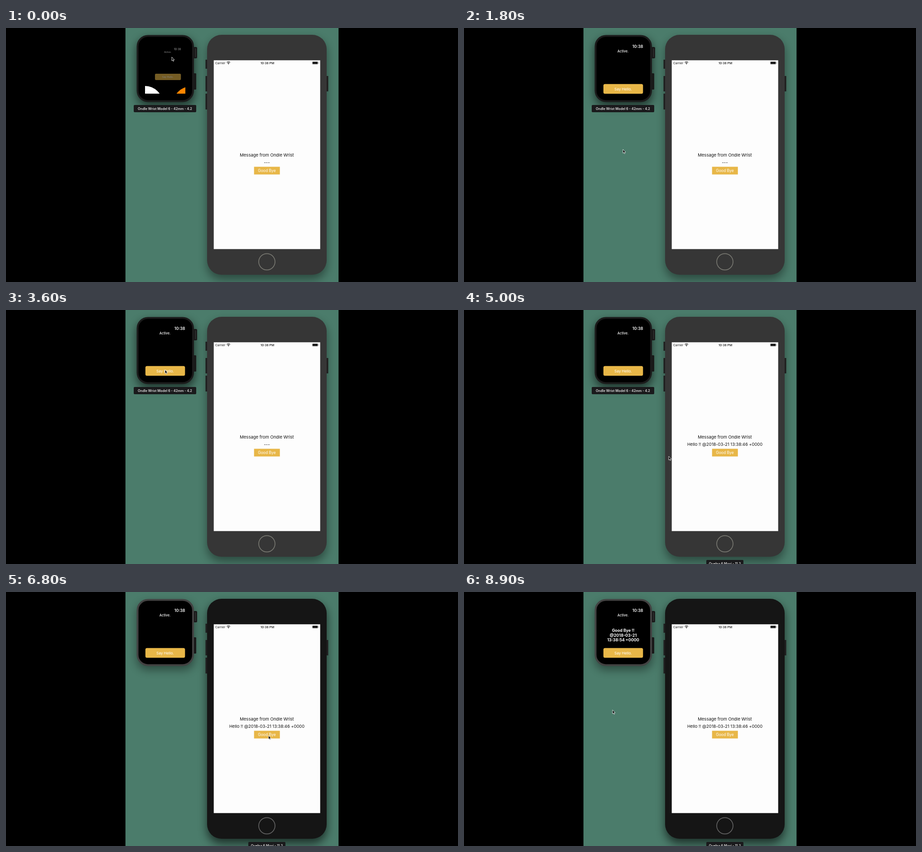
Animation, 998 px wide and 561 px high, one loop 9 s. Source, as an HTML page:

```html
<!DOCTYPE html>
<html lang="en">
<head>
<meta charset="utf-8">
<title>Watch and phone messages</title>
<style>
html, body { margin: 0; width: 100%; height: 100%; overflow: hidden; background: #000; }
svg { display: block; width: 998px; height: 561px; }
text { font-family: Inter, "Liberation Sans", sans-serif; text-anchor: middle; }
.gold { fill: #e8b748; }
.label rect { fill: #1a1a1c; }
.label text { fill: #e2e2e2; font-size: 7.3px; font-weight: 600; }
#message { font-variant-ligatures: none; }
</style>
</head>
<body>
<svg viewBox="0 0 998 561">
  <defs>
    <filter id="blur" x="-40%" y="-40%" width="180%" height="180%"><feGaussianBlur stdDeviation="10"/></filter>
    <clipPath id="desk"><rect x="263.5" width="471" height="561"/></clipPath>
    <clipPath id="face"><rect x="307" y="36" width="89" height="109"/></clipPath>
  </defs>
  <rect width="998" height="561"/>
  <g clip-path="url(#desk)">
    <rect x="263.5" width="471" height="561" fill="#4b7c6b"/>
    <rect id="watchShadow" x="289" y="24" width="127" height="148" rx="24" filter="url(#blur)"/>
    <rect id="phoneShadow" x="444" y="24" width="264" height="532" rx="32" filter="url(#blur)"/>

    <!-- Watch -->
    <g fill="#191919">
      <rect x="411" y="42" width="11" height="25" rx="2.5"/>
      <rect x="411" y="100" width="9" height="36" rx="1.5"/>
    </g>
    <path d="M418.5 45v19" stroke="#343434" stroke-width="1.5"/>
    <rect id="bezel" x="290.5" y="17.5" width="122.5" height="144" rx="23" stroke-width="4"/>
    <g clip-path="url(#face)">
      <g id="icons">
        <circle cx="307" cy="167" r="39" fill="#fff"/>
        <circle cx="408" cy="168" r="39" fill="#ff8500"/>
      </g>
    </g>
    <g id="app" fill="#fff">
      <text x="383.6" y="44" font-size="8.8" font-weight="600">10:38</text>
      <text x="351" y="53.6" font-size="7.4" font-weight="500">Active.</text>
      <g id="bye" font-size="8.9" font-weight="700">
        <text x="351.5" y="88.2">Good Bye !!</text>
        <text x="351.5" y="98.7">@2018-03-21</text>
        <text x="351.5" y="109.2">13:38:54 +0000</text>
      </g>
      <rect class="gold" x="307.8" y="123.7" width="87.5" height="21.5" rx="3.5"/>
      <text x="351.3" y="137.6" font-size="8.2">Say Hello.</text>
    </g>
    <g id="watchLabel" class="label">
      <rect x="282" y="170" width="138" height="16" rx="2"/>
      <text x="351" y="181">Ondle Wrist Model 6 - 42mm - 4.2</text>
    </g>

    <!-- Phone -->
    <path d="M442.5 70v20M442.5 106v34M442.5 145v35M709.5 106v34" stroke="#1f1f1f" stroke-width="4"/>
    <rect id="body" x="444" y="15" width="264" height="530" rx="32"/>
    <rect x="458.7" y="71.3" width="235" height="417" fill="#fdfdfd"/>
    <circle id="home" cx="576" cy="516.3" r="18" fill="none" stroke-width="1.7"/>
    <g fill="#111">
      <text x="473" y="79.8" font-size="6.8">Carrier</text>
      <text x="577" y="79.8" font-size="6.8" font-weight="500">10:38 PM</text>
      <path d="M487.4 75.8Q491.2 72.7 495 75.8M489 77.8Q491.2 75.8 493.4 77.8" fill="none" stroke="#111" stroke-width="1.2"/>
      <path d="M489.9 79l1.3 1.4 1.3-1.4q-1.3-1-2.6 0z"/>
      <rect x="676" y="74" width="13" height="6.3" rx="1.5" fill="none" stroke="#999" stroke-width=".6"/>
      <rect x="676.8" y="74.7" width="11.4" height="4.9" rx="1"/>
      <rect x="689.6" y="76" width="1" height="2.4" fill="#888"/>
      <text x="576" y="283.5" font-size="9.5">Message from Ondle Wrist</text>
      <text id="message" x="576" y="299.6" font-size="9.35"></text>
    </g>
    <rect class="gold" x="547.7" y="306.5" width="57" height="17"/>
    <text x="576" y="318" font-size="8.5" fill="#fff">Good Bye</text>
    <g id="phoneLabel" class="label">
      <rect x="535" y="552" width="82" height="16" rx="2"/>
      <text x="576" y="563">Quelna 6 Maxi - 11.2</text>
    </g>

    <path id="cursor" d="M0 0v8.4l1.9-1.7 1.3 3 1.4-.6-1.3-2.9h2.6z" fill="#080808" stroke="#fff" stroke-width=".8"/>
  </g>
</svg>
<script>
const $ = id => document.getElementById(id);
const LOOP = 9000, STEP = 100;

// Pointer stops: time, x, y
const stops = [
  [0, 366, 64], [500, 366, 64], [1400, 351, 268], [2500, 351, 268], [3300, 351, 132],
  [4200, 351, 132], [5000, 452, 323], [5900, 579.5, 317], [7700, 579.5, 317],
  [8700, 328, 260.5], [LOOP, 328, 260.5]
];

const ease = u => u * u * (3 - 2 * u);
const set = (id, name, value) => $(id).setAttribute(name, value);
const show = (id, on) => set(id, "display", on ? "inline" : "none");
const zoom = (id, k) => set(id, "transform", `translate(369 58) scale(${k}) translate(-369 -58)`);

function pointerAt(t) {
  const i = stops.findIndex(s => s[0] > t);
  const [t0, x0, y0] = stops[i - 1], [t1, x1, y1] = stops[i];
  const u = ease((t - t0) / (t1 - t0));
  return [x0 + (x1 - x0) * u, y0 + (y1 - y0) * u];
}

function draw(t) {
  const open = 1 - (1 - Math.min(t / 400, 1)) ** 2;
  const scale = 0.655 + 0.345 * open;
  zoom("app", scale);
  set("app", "opacity", 0.5 + 0.5 * open);
  zoom("icons", scale / 0.655);
  show("icons", open < 1);

  // The focused device is darker and casts the stronger shadow
  const phoneActive = t >= 6500;
  set("bezel", "stroke", phoneActive ? "#424242" : "#1b1b1b");
  set("body", "fill", phoneActive ? "#151515" : "#363636");
  set("home", "stroke", phoneActive ? "#626262" : "#777770");
  set("watchShadow", "opacity", phoneActive ? 0.4 : 0.6);
  set("phoneShadow", "opacity", phoneActive ? 0.6 : 0.4);
  show("watchLabel", !phoneActive);
  show("phoneLabel", t >= 5000);

  $("message").textContent = t < 4000 ? "---" : "Hello !! @2018-03-21 13:38:46 +0000";
  show("bye", t >= 7200);
  set("cursor", "transform", `translate(${pointerAt(t)})`);
}

const start = performance.now();
function tick() {
  const t = (performance.now() - start) % LOOP;
  draw(Math.floor(t / STEP) * STEP);
  requestAnimationFrame(tick);
}
draw(0);
requestAnimationFrame(tick);
</script>
</body>
</html>
```
